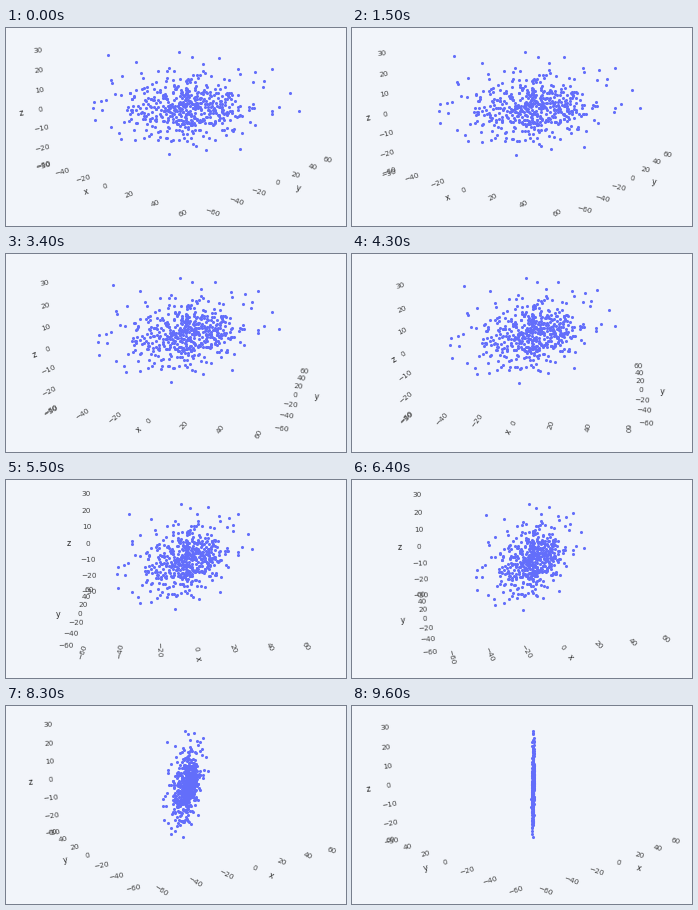
Animation of 340 by 198 pixels, one loop 9.7 s. Source, as a matplotlib script:

```python
import numpy as np
import matplotlib.pyplot as plt
from matplotlib.animation import FuncAnimation

W, H, DPI = 340, 198, 100
FRAMES, INTERVAL = 97, 100
PX = 72 / DPI
INK, TITLE_INK, DOT, PAPER = "#444444", "#2a2a2a", "#636efa", "#f2f5fa"

# Camera: screen centre, focal length, distance, elevation, height scale
CX, CY, FOCAL, DIST = 181, 78, 561, 362
ELEV = np.arcsin(0.195)
Z_SCALE = 1.225
EDGE, TICK, TITLE, FLOOR = 60, 70, 83.5, -29.3

# Isolated points around the cloud, as (position along the diagonal, height)
OUTLIERS = np.array([
    (-35.2, 27.1), (-3.7, 28.6), (2.3, 26), (14.6, 25.3), (-22.8, 23.4),
    (23.3, 19.6), (38.8, 19.1), (31, 17.9), (24.2, 17), (7.3, 22.4),
    (-29.2, 16), (-34.2, 14), (-33.8, 12.8), (35.2, 13.2), (34.7, 10),
    (30.1, 12.7), (47.5, 6.6), (52, -3.6), (42.5, -0.9), (39.3, -3),
    (39.3, -5), (31.5, -10.9), (25.6, -15.2), (24.7, -24), (8.7, -24.2),
    (2.7, -21), (4, -22), (-8.2, -26), (-19.6, -17), (-23.7, -18),
    (-30.1, -17.3), (-31, -14), (-34.7, -10.8), (-42, -6.9), (-42.5, -0.4),
    (-42, 2.8), (-38.8, 3.2), (-38.4, -1.6), (-36.5, 3.8), (-32.4, 7),
    (18.3, -16), (12.8, -18.8), (-20.5, 17.6), (-13.2, 18.8), (-8.2, 20.3),
])


def make_cloud(count=470):
    rng = np.random.default_rng(7)
    core = rng.normal((0.5, 0.5), (15, 9), (count * 2, 2))
    inside = (core[:, 0] / 33) ** 2 + (core[:, 1] / 20) ** 2 < 1
    return np.vstack([core[inside][:count], OUTLIERS]).T


def azimuth(t):
    """Camera angle in radians; the turn starts slowly and settles."""
    turned = 10.5 * t - 0.17 * ((t - 6) ** 3 + 216) / 3
    return np.radians(-48.3 - turned)


def project(x, y, z, az):
    right = -x * np.sin(az) + y * np.cos(az)
    toward = x * np.cos(az) + y * np.sin(az)
    up = z * Z_SCALE
    depth = DIST - toward * np.cos(ELEV) - up * np.sin(ELEV)
    rise = up * np.cos(ELEV) - toward * np.sin(ELEV)
    return CX + FOCAL * right / depth, CY - FOCAL * rise / depth


def place(label, point, along, az):
    """Centre a label on a point and turn it along a data axis."""
    x, y, z = point
    sx, sy = project(x, y, z, az)
    ex, ey = project(x + along[0], y + along[1], z, az)
    angle = np.degrees(np.arctan2(sy - ey, ex - sx))
    label.set_position((sx, sy))
    label.set_rotation((angle + 90) % 180 - 90)


fig = plt.figure(figsize=(W / DPI, H / DPI), dpi=DPI, facecolor=PAPER)
ax = fig.add_axes([0, 0, 1, 1])
ax.set(xlim=(0, W), ylim=(H, 0))
ax.axis("off")

diagonal, height = make_cloud()
dots, = ax.plot([], [], "o", color=DOT, ms=3.1 * PX, mew=0)


def make_label(text, size, color):
    return ax.text(0, 0, text, size=size * PX, color=color, family="DejaVu Sans",
                   ha="center", va="center", rotation_mode="default")


def make_axis(name, values):
    ticks = [(v, make_label(str(v).replace("-", "\u2212"), 7.4, INK)) for v in values]
    return ticks, make_label(name, 8, TITLE_INK)


wide = range(-60, 61, 20)
axes = {"x": make_axis("x", wide), "y": make_axis("y", wide),
        "z": make_axis("z", range(-30, 31, 10))}


def draw_axis(name, point_at, along, az):
    ticks, title = axes[name]
    for value, label in ticks:
        place(label, point_at(value, TICK), along, az)
    place(title, point_at(0, TITLE), along, az)


def update(frame):
    az = azimuth(frame * INTERVAL / 1000)
    dots.set_data(*project(diagonal, diagonal, height, az))

    along_x, along_y = (1, 0), (0, 1)
    draw_axis("x", lambda v, out: (v, -out, FLOOR), along_y, az)
    # The y and z axes swap edges when the camera passes the front face
    if np.cos(az) > 0:
        draw_axis("y", lambda v, out: (out, v, FLOOR), along_x, az)
        draw_axis("z", lambda v, out: (-EDGE, -out, v), along_y, az)
    else:
        draw_axis("y", lambda v, out: (-out, v, FLOOR), along_x, az)
        draw_axis("z", lambda v, out: (-out, EDGE, v), along_x, az)


anim = FuncAnimation(fig, update, frames=FRAMES, interval=INTERVAL,
                     init_func=lambda: update(0), repeat=True, repeat_delay=0)
plt.show()
```
